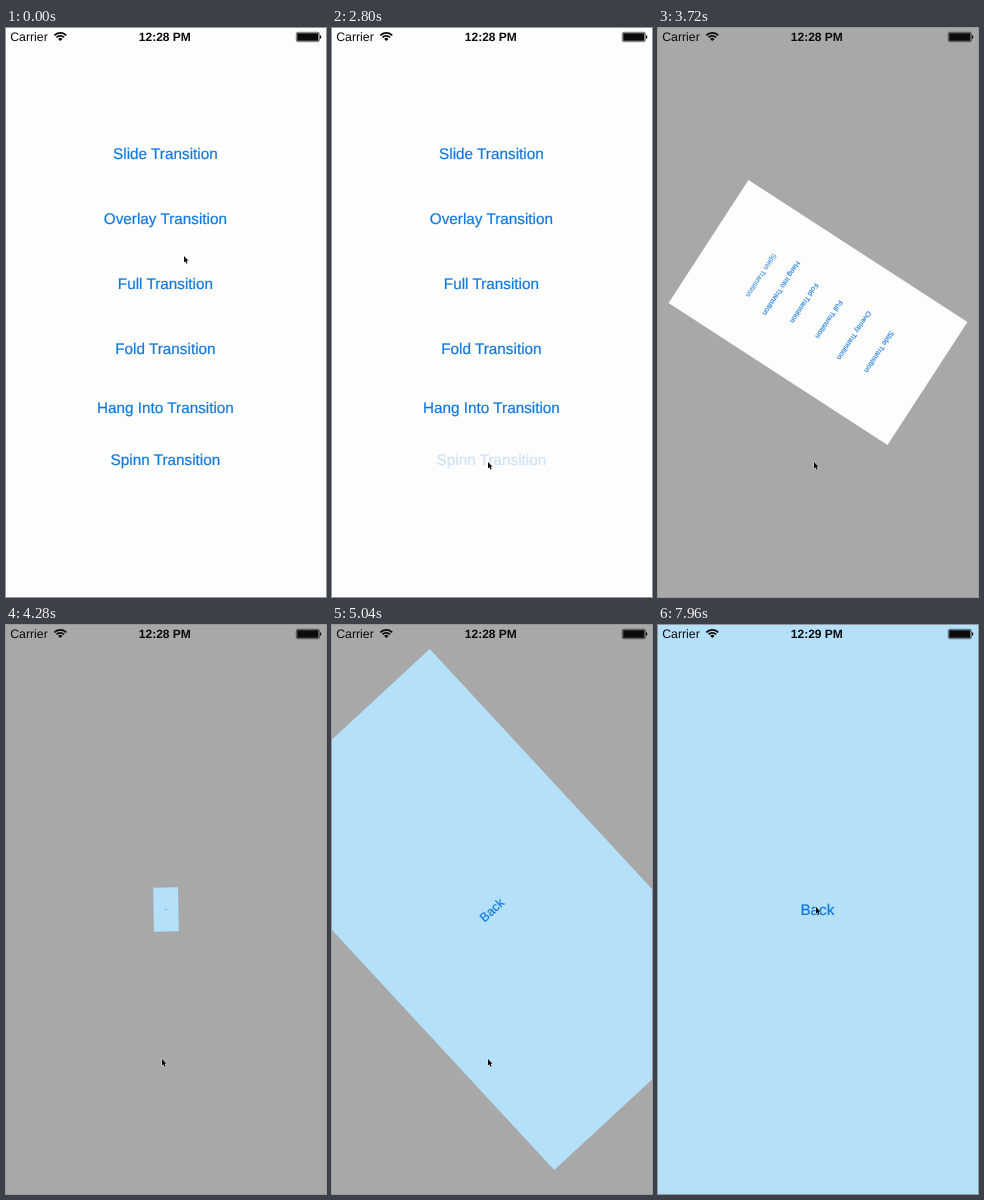
Animation, 320 px wide and 569 px high, one loop 8000 ms. Source, as an HTML page with a canvas:

```html
<!DOCTYPE html>
<html lang="en">
<head>
<meta charset="utf-8">
<title>Spin transition</title>
<style>
  html, body { margin: 0; width: 100%; height: 100%; overflow: hidden; background: #fdfdfd; }
  canvas { display: block; width: 320px; height: 569px; }
</style>
</head>
<body>
<canvas id="stage"></canvas>
<script>
const W = 320, H = 569, LOOP = 8000, STEP = 40;
const FONT = '"Liberation Sans", Arial, sans-serif';
const WHITE = '#fdfdfd', SKY = '#b4e0f9', GREY = '#a8a8a8', LINK = '#0f78de', INK = '#0b0b0b';

const SHRINK = { start: 3189, length: 981 };
const GROW = { start: 4224, length: 1416 };

const buttons = [
  ['Slide Transition', 126], ['Overlay Transition', 191], ['Full Transition', 256],
  ['Fold Transition', 320.5], ['Hang Into Transition', 380], ['Spinn Transition', 432]
];

// time, x, y of the pointer tip
const pointerPath = [
  [0, 178, 228], [420, 197, 310], [840, 167, 406], [1080, 156, 435], [1400, 197, 382],
  [1880, 197, 382], [2120, 156, 434], [6000, 156, 434], [6850, 158, 282], [LOOP, 158, 282]
];

const canvas = document.getElementById('stage');
const ctx = canvas.getContext('2d');
const ratio = window.devicePixelRatio || 1;
canvas.width = Math.round(W * ratio);
canvas.height = Math.round(H * ratio);
ctx.textRendering = 'geometricPrecision';

const clamp = v => Math.min(1, Math.max(0, v));
const progress = (t, phase) => clamp((t - phase.start) / phase.length);
const mix = (a, b, k) => a + (b - a) * k;

function text(label, x, y, font, color, align = 'center') {
  ctx.font = `${font} ${FONT}`;
  ctx.fillStyle = color;
  ctx.textAlign = align;
  ctx.fillText(label, x, y);
}

function link(label, centerY, alpha = 1) {
  const x = W / 2 - 0.6, y = centerY + 5.2;
  ctx.globalAlpha = alpha;
  text(label, x, y, '15.3px', LINK);
  // a hairline outline gives the slightly heavier weight
  ctx.strokeStyle = LINK;
  ctx.lineWidth = 0.2;
  ctx.strokeText(label, x, y);
  ctx.globalAlpha = 1;
}

function fill(color) {
  ctx.fillStyle = color;
  ctx.fillRect(0, 0, W, H);
}

function menuCard(t) {
  fill(WHITE);
  const pressed = t < 2800 ? 1 : mix(0.18, 1, clamp((t - 3200) / 700));
  buttons.forEach(([label, y], i) => link(label, y, i === buttons.length - 1 ? pressed : 1));
}

function detailCard() {
  fill(SKY);
  link('Back', 285);
}

function drawCard(card, scale, degrees, t) {
  if (scale < 0.002) return;
  ctx.save();
  ctx.translate(W / 2, H / 2);
  ctx.rotate(degrees * Math.PI / 180);
  ctx.scale(scale, scale);
  ctx.translate(-W / 2, -H / 2);
  card(t);
  ctx.restore();
}

function drawScene(t) {
  fill(GREY);
  if (t < GROW.start) {
    const p = progress(t, SHRINK);
    drawCard(menuCard, 1 - p, -(649 * p + 838.7 * p * p), t);
  } else {
    const rest = 1 - progress(t, GROW);
    drawCard(detailCard, 1 - rest * rest, 748.6 * rest, t);
  }
}

function drawStatusBar(t) {
  text('Carrier', 4.2, 13, '12.3px', INK, 'left');
  text(t < 5760 ? '12:28 PM' : '12:29 PM', 158.8, 13, 'bold 12px', INK);

  ctx.strokeStyle = INK;
  ctx.lineWidth = 1.7;
  for (const radius of [8.2, 5.2]) {
    ctx.beginPath();
    ctx.arc(54.3, 13, radius, -Math.PI * 0.76, -Math.PI * 0.24);
    ctx.stroke();
  }
  ctx.fillStyle = INK;
  ctx.beginPath();
  ctx.moveTo(54.3, 13);
  ctx.arc(54.3, 13, 3, -Math.PI * 0.76, -Math.PI * 0.24);
  ctx.fill();

  ctx.lineWidth = 0.6;
  ctx.beginPath();
  ctx.roundRect(290.3, 4.3, 23, 9.4, 1.5);
  ctx.stroke();
  ctx.fillRect(291.2, 5.2, 21.2, 7.6);
  ctx.fillRect(314, 7.5, 1.2, 3);
}

function drawPointer(t) {
  const i = pointerPath.findIndex(point => point[0] > t);
  const [t0, x0, y0] = pointerPath[i - 1], [t1, x1, y1] = pointerPath[i];
  const k = (t - t0) / (t1 - t0), eased = k * k * (3 - 2 * k);
  ctx.save();
  ctx.translate(mix(x0, x1, eased), mix(y0, y1, eased));
  ctx.scale(0.9, 0.9);
  ctx.beginPath();
  [[0, 0], [0, 7.2], [1.6, 5.8], [2.8, 8.6], [4, 8.1], [2.9, 5.4], [5, 5.2]]
    .forEach(([x, y]) => ctx.lineTo(x, y));
  ctx.closePath();
  ctx.strokeStyle = 'rgba(255,255,255,0.7)';
  ctx.lineWidth = 1;
  ctx.stroke();
  ctx.fillStyle = INK;
  ctx.fill();
  ctx.restore();
}

function render(now) {
  const t = Math.floor(now % LOOP / STEP) * STEP;
  ctx.setTransform(ratio, 0, 0, ratio, 0, 0);
  drawScene(t);
  drawStatusBar(t);
  drawPointer(t);
}

const began = performance.now();
function tick() {
  render(performance.now() - began);
  requestAnimationFrame(tick);
}
tick();
</script>
</body>
</html>
```
